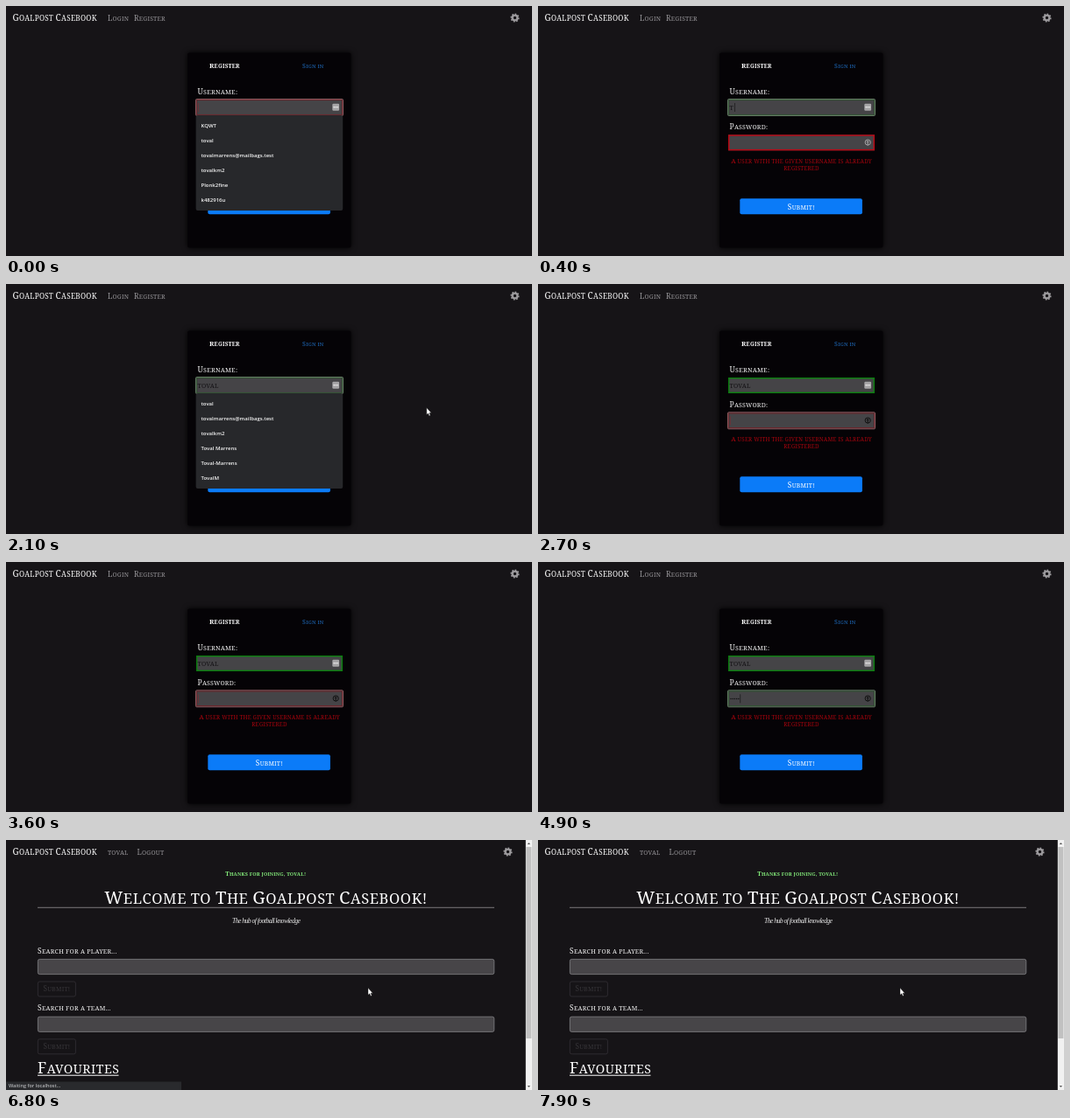
An HTML page for the animation above (8 s loop, 600 by 286 pixels).

```html
<!DOCTYPE html>
<html lang="en">
<head>
<meta charset="utf-8">
<title>Register</title>
<style>
  html, body { margin: 0; width: 100%; height: 100%; overflow: hidden; background: #161417; }
  svg { display: block; }
  text { font-family: "Noto Serif", "Liberation Serif", serif; font-weight: 500; letter-spacing: .03em; white-space: pre; }
  .bold { font-weight: 700; }
  .ui { font-family: "Open Sans", "Noto Sans", sans-serif; font-weight: 600; letter-spacing: 0; }
  .script { font-family: "Liberation Serif", serif; font-style: italic; font-weight: 400; letter-spacing: -.6px; }
  .card { filter: drop-shadow(0 0 3px #000); }
</style>
</head>
<body>
<svg id="stage" width="600" height="286" viewBox="0 0 600 286"></svg>
<script>
const LOOP = 8000;
const SITE = "Goalpost Casebook";
const USER = "toval";
const KEY_TIMES = [400, 700, 1100, 1300, 1500];
const DOT_TIMES = [4000, 4200, 4400, 4600, 4800];
const FOCUS_PASSWORD = 2500, PRESS = 5600, STATUS_ON = 6300, PAGE = 6600, STATUS_OFF = 7200;
const RECENT = ["KQWT", "toval", "tovalmarrens@mailbags.test", "tovalkm2", "Plonk2fine", "k482916u"];
const MATCHES = ["toval", "tovalmarrens@mailbags.test", "tovalkm2", "Toval Marrens", "Toval-Marrens", "TovalM"];
// time, x, y of the pointer tip
const POINTER = [
  [1900, 479.8, 141.6], [2200, 479.8, 141.6], [2500, 374, 153],
  [5250, 374, 153], [5500, 343, 227], [5750, 343, 227],
  [6100, 362.6, 187.2], [6350, 413, 169.3]
];

const stage = document.getElementById("stage");

function add(parent, name, attrs = {}) {
  const node = document.createElementNS("http://www.w3.org/2000/svg", name);
  for (const key in attrs) node.setAttribute(key, attrs[key]);
  parent.append(node);
  return node;
}
const group = (parent = stage) => add(parent, "g");
const show = (node, on) => node.setAttribute("visibility", on ? "inherit" : "hidden");

function rect(parent, x, y, width, height, fill, more = {}) {
  return add(parent, "rect", { x, y, width, height, fill, ...more });
}
function label(parent, x, y, size, fill, string, more = {}) {
  const node = add(parent, "text", { x, y, "font-size": size, fill, ...more });
  node.textContent = string;
  return node;
}
// Small capitals: lower case runs become capitals at a reduced size.
function setCaps(node, string, size) {
  node.textContent = "";
  for (const run of string.match(/[A-Z]+|[^A-Z]+/g) || []) {
    const small = !/[A-Z]/.test(run);
    add(node, "tspan", { "font-size": small ? size * .82 : size }).textContent = run.toUpperCase();
  }
}
function caps(parent, x, y, size, fill, string, more = {}) {
  const node = label(parent, x, y, size, fill, "", more);
  setCaps(node, string, size);
  return node;
}
const MIDDLE = { "text-anchor": "middle" };
const BOLD = { class: "bold" };

function gear(parent, cx, cy) {
  add(parent, "circle", { cx, cy, r: 2.9, fill: "none", stroke: "#9b999c", "stroke-width": 2.4 });
  add(parent, "circle", { cx, cy, r: 4.3, fill: "none", stroke: "#9b999c", "stroke-width": 1.6,
    pathLength: 16, "stroke-dasharray": "1 1" });
}
function navbar(parent, links, gearX, gearY) {
  caps(parent, 7.5, 17, 10, "#fff", SITE);
  for (const [x, string] of links) caps(parent, x, 17, 8.4, "#98969a", string);
  gear(parent, gearX, gearY);
}

function field(parent, y) {
  rect(parent, 217, y, 167, 18, "#454447");
  const ring = rect(parent, 216.5, y - .5, 168, 19, "none", { rx: 1, "stroke-width": .8 });
  const edge = rect(parent, 217.7, y + .7, 165.6, 16.6, "none");
  const value = label(parent, 218.5, y + 12.3, 8.6, "#141215", "");
  const caret = rect(parent, 219, y + 4, .6, 10, "#111");
  return {
    value, caret,
    update(valid, focused) {
      const color = valid ? "#0b800f" : "#bd0713";
      show(ring, focused);
      ring.setAttribute("stroke", valid ? "#7f9b7f" : "#b0757a");
      edge.setAttribute("stroke", focused ? (valid ? "#2c5b2c" : "#7c1a22") : color);
      edge.setAttribute("stroke-width", focused ? .7 : 1.4);
      caret.setAttribute("fill", valid ? "#111" : "#7d2a31");
    }
  };
}

// Registration form
const form = group();
rect(form, 0, 0, 600, 286, "#161417");
navbar(form, [[116, "Login"], [146, "Register"]], 580.5, 13.5);
rect(form, 207, 53.5, 186.5, 223, "#050306", { rx: 2, class: "card" });
caps(form, 232, 71, 7.6, "#fff", "Register", BOLD);
caps(form, 338, 71, 7.2, "#1f6fc4", "Sign in");
caps(form, 218.5, 100.5, 8.8, "#f4f4f4", "Username:");
caps(form, 218.5, 141, 8.5, "#f4f4f4", "Password:");
const username = field(form, 107);
const password = field(form, 147.3);

rect(form, 372.3, 111.8, 7.8, 8, "#a5a4a6", { rx: 1.2 });
for (const cx of [374.2, 376.2, 378.2]) add(form, "circle", { cx, cy: 115.8, r: .75, fill: "#fff" });
const keyIcon = add(form, "g", { fill: "none", "stroke-width": 1 });
add(keyIcon, "circle", { cx: 376.2, cy: 156, r: 3.1 });
add(keyIcon, "circle", { cx: 376.2, cy: 155.3, r: .9 });
add(keyIcon, "path", { d: "M376.2 156v3.5" });

const dots = DOT_TIMES.map((_, i) =>
  add(form, "circle", { cx: 220 + i * 2.2, cy: 156.4, r: .75, fill: "#111" }));

const warning = group(form);
caps(warning, 300.5, 179.5, 7.6, "#a8040d", "A user with the given username is already", MIDDLE);
caps(warning, 300.5, 188, 7.6, "#a8040d", "registered", MIDDLE);

const halo = rect(form, 228.8, 218.9, 142.4, 20.7, "#0c355f", { rx: 3 });
const button = rect(form, 230.3, 220.3, 139.6, 18, "#0b7bf8", { rx: 2 });
caps(form, 300.3, 232.5, 8.3, "#fff", "Submit!", MIDDLE);

function suggestions(items) {
  const list = group(form);
  rect(list, 216.6, 125, 167.6, 109, "#27282b", { rx: 2 });
  items.forEach((item, i) =>
    label(list, 222.5, 139.2 + i * 16.9, 6, "#f5f5f5", item, { class: "ui" }));
  return list;
}
const recent = suggestions(RECENT);
const matches = suggestions(MATCHES);

// Welcome page
const home = group();
rect(home, 0, 0, 600, 286, "#161417");
navbar(home, [[116, USER], [149.5, "Logout"]], 572.5, 13.5);
caps(home, 296.3, 41, 6.7, "#85ee7c", `Thanks for joining, ${USER}!`, { ...MIDDLE, ...BOLD });
caps(home, 296.5, 73, 20.1, "#fff", `Welcome to The ${SITE}!`, MIDDLE);
rect(home, 36, 76.8, 521, .9, "#858387");
label(home, 296.7, 95, 7.8, "#e8e8e8", "The hub of football knowledge", { ...MIDDLE, class: "script" });

function search(y, string) {
  caps(home, 36, y, 8.6, "#f4f4f4", string);
  rect(home, 36.4, y + 6.9, 520.4, 17.2, "#474548", { rx: 2, stroke: "#858387", "stroke-width": .8 });
  rect(home, 36.4, y + 32.5, 43, 17, "none", { rx: 2, stroke: "#343236", "stroke-width": .8 });
  caps(home, 57.9, y + 43.9, 8.3, "#373539", "Submit!", MIDDLE);
}
search(129.5, "Search for a player...");
search(195.3, "Search for a team...");
caps(home, 36, 267, 17.2, "#fff", "Favourites");
rect(home, 36, 268.7, 92.5, 1, "#fff");
rect(home, 592.8, 0, 7.2, 286, "#f1f1f1");
rect(home, 593.4, 8, 6, 219, "#c1c1c1");
add(home, "path", { d: "M594.8 5l1.6-2 1.6 2zM594.8 281l1.6 2 1.6-2z", fill: "#555" });

const status = group();
rect(status, 0, 276.5, 200, 9.5, "#292a2d");
label(status, 3, 283.4, 5.5, "#b5b6b9", "Waiting for localhost...", { class: "ui" });

const pointer = add(stage, "path", {
  d: "M0 0V8L1.8 6.4 3 9.3 4.3 8.7 3.1 5.9H5.4Z",
  fill: "#fff", stroke: "#111", "stroke-width": .4
});

const countUntil = (times, t) => times.filter(time => time <= t).length;

function pointerAt(t) {
  const next = POINTER.findIndex(stop => stop[0] > t);
  if (next < 0) return POINTER[POINTER.length - 1].slice(1);
  if (next === 0) return POINTER[0].slice(1);
  const [a, b] = [POINTER[next - 1], POINTER[next]];
  const k = (t - a[0]) / (b[0] - a[0]);
  const eased = k * k * (3 - 2 * k);
  return [1, 2].map(i => a[i] + (b[i] - a[i]) * eased);
}

let shownKeys = -1;
function draw(t) {
  const keys = countUntil(KEY_TIMES, t);
  const typedDots = countUntil(DOT_TIMES, t);
  const onUsername = t < FOCUS_PASSWORD;
  const onPassword = !onUsername && t < PRESS;
  const pressed = t >= PRESS;

  show(form, t < PAGE);
  show(home, t >= PAGE);
  show(status, t >= STATUS_ON && t < STATUS_OFF);

  if (keys !== shownKeys) {
    setCaps(username.value, USER.slice(0, keys), 8.6);
    shownKeys = keys;
  }
  username.update(keys > 0, onUsername);
  password.update(typedDots > 0, onPassword);
  dots.forEach((dot, i) => show(dot, i < typedDots));
  keyIcon.setAttribute("stroke", onPassword ? "#111" : "#a5a4a6");

  const lastInput = Math.max(0, ...[...KEY_TIMES, FOCUS_PASSWORD, ...DOT_TIMES].filter(time => time <= t));
  const blink = (t - lastInput) % 1000 < 500;
  show(username.caret, onUsername && blink);
  show(password.caret, onPassword && blink);
  username.caret.setAttribute("x", 219 + keys * 5);
  password.caret.setAttribute("x", 219 + typedDots * 2.3);

  // The list closes briefly after each key while it refreshes.
  const refreshing = KEY_TIMES.some(time => t >= time && t < time + 100);
  show(recent, onUsername && keys === 0);
  show(matches, onUsername && keys > 0 && !refreshing);

  show(halo, pressed);
  button.setAttribute("fill", pressed ? "#0767d2" : "#0b7bf8");

  const [x, y] = pointerAt(t);
  pointer.setAttribute("transform", `translate(${x} ${y})`);
  show(pointer, t >= 1900 && t < FOCUS_PASSWORD || t >= 5300);
}

const start = performance.now();
function tick() {
  draw((performance.now() - start) % LOOP);
  requestAnimationFrame(tick);
}
draw(0);
requestAnimationFrame(tick);
</script>
</body>
</html>
```
